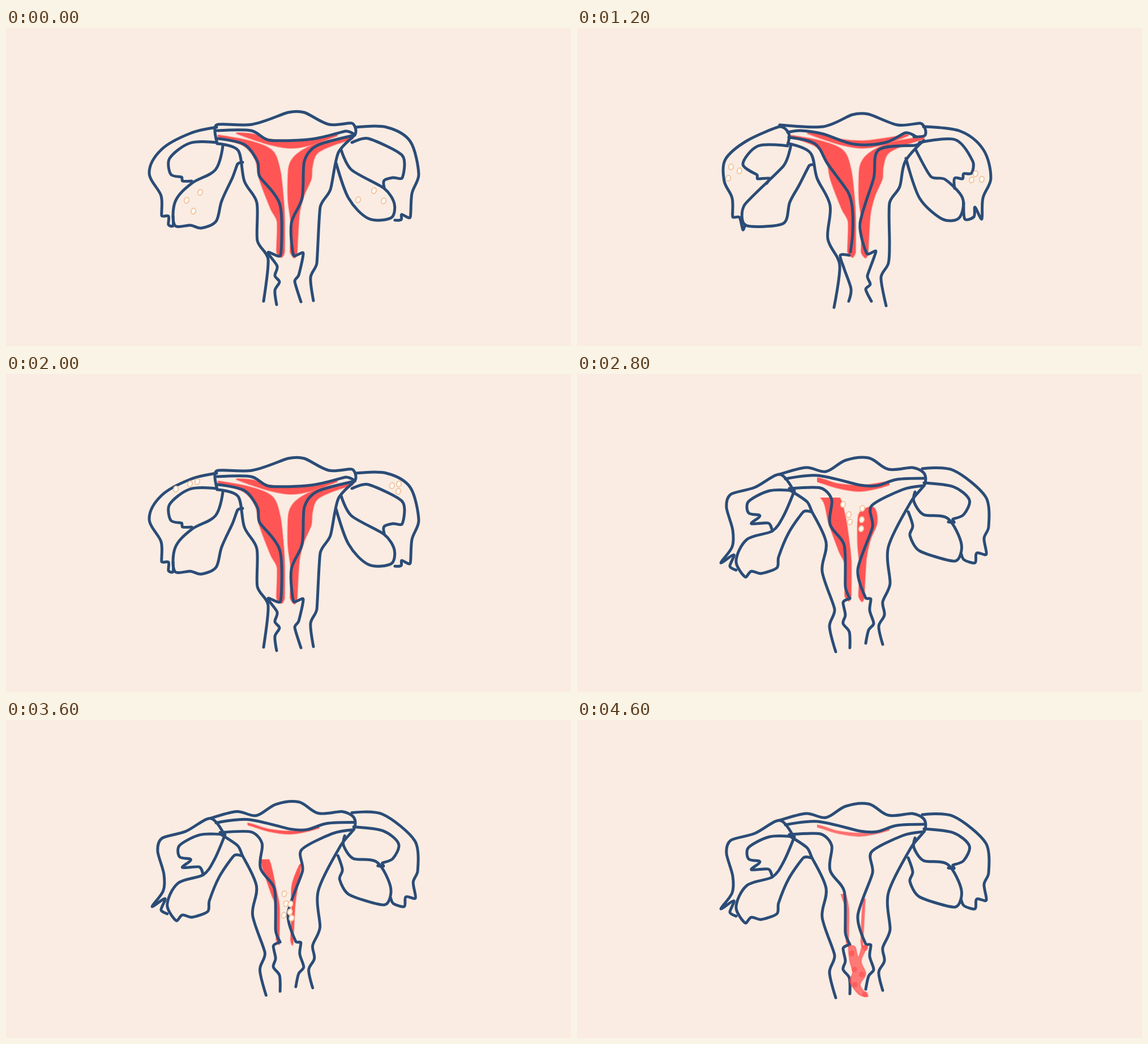
An HTML page with a canvas for the animation above (4800 ms loop, 998 by 561 pixels).

```html
<!DOCTYPE html>
<html lang="en">
<head>
<meta charset="utf-8">
<style>
html, body { margin: 0; width: 100%; height: 100%; overflow: hidden; background: #faece2 }
canvas { display: block }
</style>
</head>
<body>
<canvas id="stage" width="998" height="561"></canvas>
<script>
const ctx = document.getElementById('stage').getContext('2d');
const STEP = 200, COUNT = 24;

const pairs = s => s.split(' ').map(Number).flatMap((x, i, a) => i % 2 ? [] : [[x, a[i + 1]]]);
const mix = (a, b, k) => a + (b - a) * k;
const mixPt = (p, q, k) => [mix(p[0], q[0], k), mix(p[1], q[1], k)];

// Smooth curve through a few points; tight corners stay sharp.
function trace(pts, closed) {
  const n = pts.length;
  const at = i => closed ? pts[(i + n) % n] : pts[Math.max(0, Math.min(n - 1, i))];
  const dist = (p, q) => Math.hypot(q[0] - p[0], q[1] - p[1]);
  const handle = (i, sign) => {
    const [p, q, r] = [at(i - 1), at(i), at(i + 1)];
    const a = dist(p, q), b = dist(q, r);
    const k = sign * .36 * Math.min(a, b) / (a + b || 1);
    return [q[0] + (r[0] - p[0]) * k, q[1] + (r[1] - p[1]) * k];
  };
  ctx.beginPath();
  ctx.moveTo(...pts[0]);
  for (let i = 0; i < (closed ? n : n - 1); i++)
    ctx.bezierCurveTo(...handle(i, 1), ...handle(i + 1, -1), ...at(i + 1));
}

function pen(points) {
  trace(pairs(points));
  ctx.stroke();
}

function calm() {
  pen('372 175 325 186 275 214 253 255 274 296 275 331 287 332 287 347 295 349 295 332');
  pen('372 202 325 203 289 230 291 258 310 263 312 270 328 270');
  pen('383 208 370 250 328 274 299 306 298 348 326 348 345 353 371 341 381 305 400 264 409 240 418 237');
  pen('373 203 372 171 435 170 498 149 527 149 570 170 611 168 617 187 587 220 573 285 555 316 549 415 538 440 543 481');
  pen('373 181 433 181 465 198 540 196 600 182 616 188');
  pen('373 195 420 205 444 235 448 262 484 312 485 401 463 396 479 420 475 437 483 448 475 463 478 488');
  pen('373 204 410 216 421 270 443 308 444 375 463 408 455 482');
  pen('616 189 550 207 527 235 523 300 504 345 508 401 525 397 517 436 510 447 521 483');
  pen('617 175 672 175 714 200 729 258 717 292 714 334 699 329 698 338 687 339');
  pen('611 202 640 195 700 225 700 264 683 264 668 269 668 281');
  pen('592 215 610 250 668 283 686 310 680 335 640 336 605 300 583 238');
}

function low() {
  pen('372 206 374 186 358 174 300 199 262 232 260 270 274 300 275 333 287 334 293 356 297 347');
  pen('372 208 320 208 293 240 318 259 319 266 340 265 335 274');
  pen('378 206 365 243 296 312 298 348 364 345 376 307 392 278 410 243 418 241');
  pen('358 171 435 174 486 153 515 152 566 171 606 168 615 178 614 190 595 192');
  pen('612 199 580 235 570 280 552 309 552 380 550 415 537 440 546 490');
  pen('372 184 395 181 435 187 490 205 545 202 580 185 598 191');
  pen('374 193 420 204 443 240 478 288 486 315 487 360 483 395');
  pen('481 401 465 401 472 425 484 460 480 482');
  pen('374 204 412 220 424 265 447 313 443 372 464 418 454 493');
  pen('613 199 597 207 533 215 524 265 500 345 512 398 528 394 513 437 518 452 510 461 520 482');
  pen('612 174 677 182 718 215 731 265 717 300 715 337 703 316 701 333 685 337 683 308');
  pen('605 202 668 197 699 235 697 256 683 257 681 266 667 265 667 283');
  pen('598 214 625 262 650 267 681 300 675 335 645 337 605 300 581 230');
}

function high() {
  pen('382 205 358 177 314 200 272 212 264 235 275 275 274 305 254 333 277 319 270 339 281 346');
  pen('383 206 340 206 303 225 303 245 323 250 308 264 338 263 345 277');
  pen('384 206 365 250 345 277 300 292 281 330 297 358 308 348 325 352 353 342 356 323 374 280 400 243 413 243');
  pen('358 177 405 165 440 172 475 152 515 148 550 168 592 165 613 175 614 195 590 225 550 305 553 370 540 402 543 425 533 445 540 477');
  pen('368 185 425 179 500 196 530 197 565 186 613 184');
  pen('375 202 430 201 450 222 447 265 472 302 474 375 482 396');
  pen('479 397 470 403 474 425 470 440 481 455 482 483');
  pen('376 205 406 225 415 243 440 297 433 348 455 415 446 445 457 490');
  pen('613 197 575 204 520 233 522 270 496 345 510 395 519 397 517 417 524 440 515 452 510 475');
  pen('610 167 665 170 722 217 727 270 719 290 723 318 706 316 703 333 684 328 679 318');
  pen('613 192 665 199 693 222 683 248 664 256 666 262 656 261');
  pen('597 208 595 225 612 248 655 255 679 300 668 330 605 312 588 285 593 268 585 243');
}

// Five-step line boil: drawing, x scale, y scale, x shift, y shift.
const poses = [
  [calm, 1, 1, 0, 0],
  [low, 1, 1, 0, 0],
  [low, .996, .98, 2, 3],
  [high, .992, .997, 6, -3],
  [high, 1, 1, 0, 0]
];

function blob(pts, alpha) {
  trace(pts, true);
  ctx.fillStyle = `rgba(255,75,75,${alpha})`;
  ctx.strokeStyle = 'rgba(255,75,75,.45)';
  ctx.lineWidth = 2.5;
  ctx.fill();
  ctx.stroke();
}

function disc(x, y, rx, ry, tilt) {
  ctx.beginPath();
  ctx.ellipse(x, y, rx, ry, tilt, 0, Math.PI * 2);
  ctx.fill();
}

// Red band between two edges; it thins towards its core and sinks below top.
function band(edgeA, edgeB, core, thick, top, alpha) {
  const a = pairs(edgeA), b = pairs(edgeB);
  const mid = a.map((p, i) => mixPt(p, b[i], core));
  const first = Math.max(0, a.findIndex(p => p[1] > top));
  const thin = e => e.map((p, i) => mixPt(mid[i], p, thick)).slice(first);
  const tip = first ? [mid[first - 1]] : [];
  ctx.save();
  ctx.beginPath();
  ctx.rect(0, top, 998, 561);
  ctx.clip();
  blob([...tip, ...thin(a), ...thin(b).reverse()], alpha);
  ctx.restore();
}

// Value at a step, from [step, value] keys.
function ease(step, ...keys) {
  const i = keys.findIndex(k => k[0] >= step);
  if (i <= 0) return keys.at(i)[1];
  const [s, v] = keys[i - 1], [t, w] = keys[i];
  return mix(v, w, (step - s) / (t - s));
}

function drawLining(step, raised) {
  const thick = ease(step, [10, 1], [14, .8], [16, .6], [20, .17], [23, .28]);
  const top = ease(step, [10, 0], [14, 222], [16, 231], [20, 276], [23, 311]);
  const alpha = step < 20 ? .93 : .72;
  ctx.save();
  if (raised) ctx.translate(-6, -4);
  band('375 192 420 208 440 232 448 268 468 320 479 342 478 395 485 404',
       '375 189 430 199 470 216 484 250 490 300 492 335 492 395 488 404',
       .35, thick, top, alpha);
  band('612 192 562 200 530 212 508 228 499 248 498 300 503 345 502 395 508 405',
       '612 196 575 208 549 222 541 245 539 267 526 297 518 330 514 398 511 405',
       .65, thick, top && top + 8, alpha);
  ctx.beginPath();
  if (step > 12) ctx.rect(430, 0, 128, 561);
  else ctx.rect(0, 0, 998, 561);
  ctx.clip();
  band('407 186 440 198 470 207 505 212 540 206 585 190',
       '409 185 436 187 465 196 505 199 540 195 583 188',
       .4, Math.max(.4, thick), 0, alpha);
  ctx.restore();
}

function drawFlow(step) {
  ctx.save();
  ctx.beginPath();
  ctx.rect(470, 390, 60, [35, 70, 110][step - 21]);
  ctx.clip();
  blob(pairs('480 400 491 400 497 418 504 399 513 400 502 425 510 448 500 468 514 487 498 484 482 462 487 445 482 425'), .7);
  ctx.fillStyle = 'rgba(255,75,75,.6)';
  for (const [x, y] of pairs('509 402 485 412 490 440 503 449 491 467 509 484')) disc(x, y, 5, 5, 0);
  ctx.restore();
}

const eggs = [
  [0, '343 290 319 304 331 323 650 287 622 303 667 305'],
  [6, '272 245 287 252 267 265 704 257 697 268 715 267'],
  [10, '325 194 338 190 300 203 682 197 694 194 693 207'],
  [14, '470 230 480 248 482 261 504 237 503 257 502 273'],
  [16, '487 266 490 295 489 304 500 270 499 297 499 312'],
  [20, '492 355 495 361 488 393 501 387 500 388 506 395']
];

function drawEggs(step) {
  const i = Math.max(1, eggs.findIndex(k => k[0] >= Math.min(step, 20)));
  const [s, from] = eggs[i - 1], [t, to] = eggs[i];
  const k = Math.min(1, (step - s) / (t - s)), end = pairs(to);
  // The tubes arch upwards; past the neck the eggs drop.
  const arch = s === 6 || s === 10 ? 16 * Math.sin(Math.PI * k) : 0;
  const drop = 40 * Math.max(0, step - 20);
  ctx.fillStyle = '#fffaf1';
  ctx.strokeStyle = '#f3c3a0';
  ctx.lineWidth = 1.9;
  pairs(from).forEach((p, j) => {
    const [x, y] = mixPt(p, end[j], k);
    disc(x, y - arch + drop, 4.1, 5.2, .25);
    ctx.stroke();
  });
}

function draw(step) {
  const [outline, sx, sy, dx, dy] = poses[step === 23 ? 4 : step % 5];
  ctx.setTransform(1, 0, 0, 1, 0, 0);
  ctx.fillStyle = '#faece2';
  ctx.fillRect(0, 0, 998, 561);
  ctx.setTransform(sx, 0, 0, sy, dx, dy);
  ctx.lineCap = ctx.lineJoin = 'round';
  drawLining(step, outline === high);
  ctx.strokeStyle = '#2b4c77';
  ctx.lineWidth = 5;
  outline();
  if (step > 20) drawFlow(step);
  if (step < 23) drawEggs(step);
}

const start = performance.now();
function tick() {
  draw(Math.floor((performance.now() - start) / STEP) % COUNT);
  requestAnimationFrame(tick);
}
tick();
</script>
</body>
</html>
```
